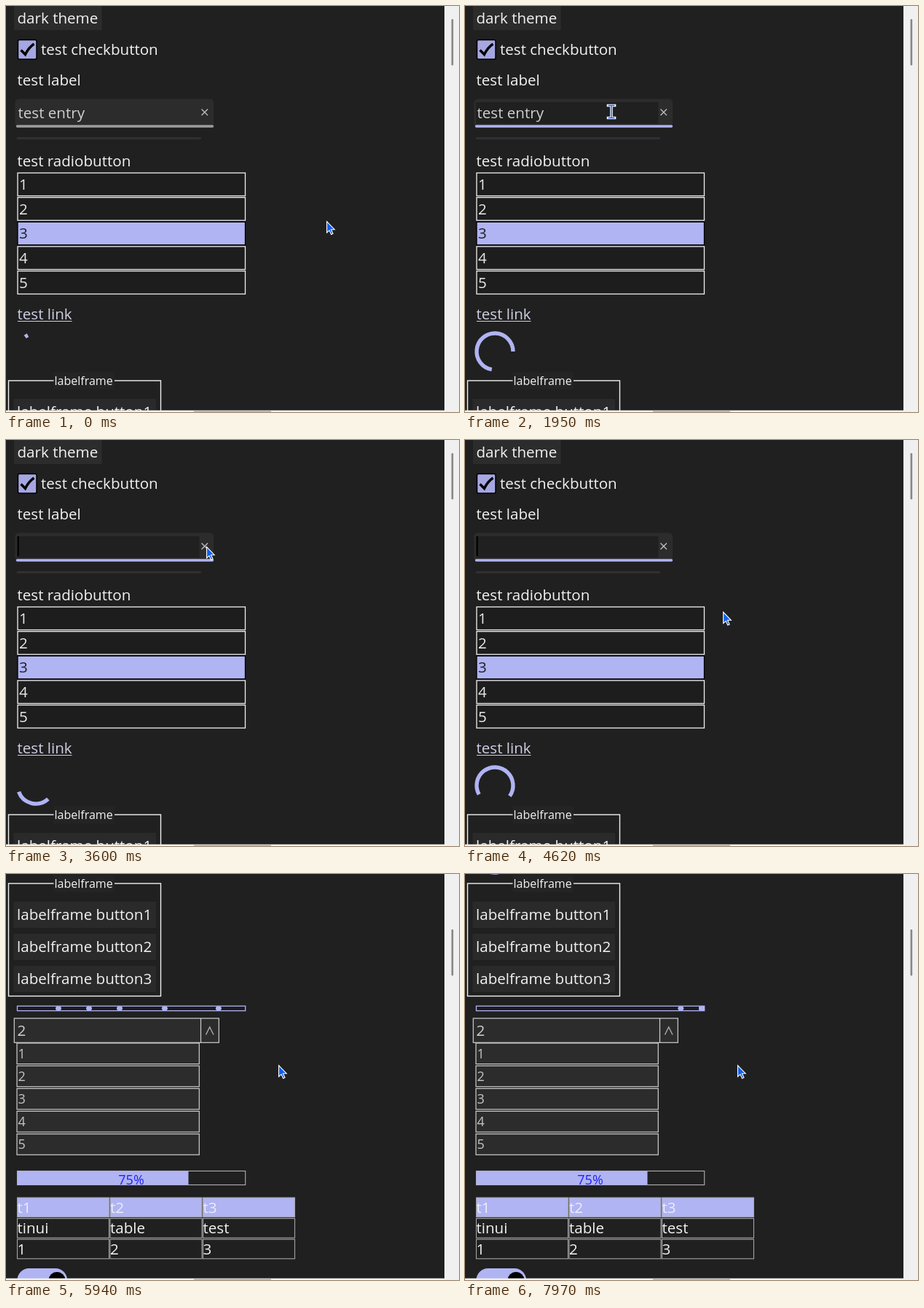
Recreate the animation shown at these times as an HTML page. Size 622 px wide and 557 px high, loop 8000 ms.

```html
<!DOCTYPE html>
<html lang="en">
<head>
<meta charset="utf-8">
<title>Widget demo</title>
<style>
  html, body { margin: 0; width: 100%; height: 100%; overflow: hidden; background: #202020; }
  svg { display: block; width: 622px; height: 557px; }
  text { font-family: "Open Sans", "Noto Sans", sans-serif; font-size: 20.6px; fill: #f2f2f2; white-space: pre; }
</style>
</head>
<body>
<svg id="stage" viewBox="0 0 622 557" xmlns="http://www.w3.org/2000/svg"></svg>
<script>
const LOOP = 8000;
const ACCENT = '#b0b4f3', BG = '#202020', PANEL = '#2c2c2c', SOFT = '#cfcfcf';
const PAGE = 501;            // scroll distance
const CLICK = 1200, CLEAR = 3200;
const stage = document.getElementById('stage');

function add(parent, tag, attrs, content) {
  const el = document.createElementNS('http://www.w3.org/2000/svg', tag);
  for (const key in attrs) el.setAttribute(key, attrs[key]);
  if (content !== undefined) el.textContent = content;
  parent.appendChild(el);
  return el;
}
const set = (el, attrs) => { for (const key in attrs) el.setAttribute(key, attrs[key]); };
const show = (el, on) => el.setAttribute('visibility', on ? 'visible' : 'hidden');
const box = (parent, x, y, right, bottom, fill, more) =>
  add(parent, 'rect', { x, y, width: right - x, height: bottom - y, fill, ...more });
const label = (parent, x, y, str, more) => add(parent, 'text', { x, y, ...more }, str);
const line = (parent, d, stroke, width, more) =>
  add(parent, 'path', { d, stroke, 'stroke-width': width, fill: 'none', ...more });

// Piecewise linear value from rows of [time, a, b]
function track(rows, t) {
  let i = 1;
  while (i < rows.length - 1 && t > rows[i][0]) i++;
  const p = rows[i - 1], q = rows[i];
  const k = Math.min(1, Math.max(0, (t - p[0]) / (q[0] - p[0])));
  return [p[1] + (q[1] - p[1]) * k, p[2] + (q[2] - p[2]) * k];
}

box(stage, 0, 0, 622, 557, BG);
const view = add(stage, 'g', {});

// Upper half of the page
const top1 = add(view, 'g', {});
box(top1, 11, -4, 131.5, 33, PANEL);
label(top1, 15.5, 23.5, 'dark theme');
box(top1, 16.5, 46.5, 42, 73, '#a6a7e2', { rx: 2, stroke: '#000', 'stroke-width': 1.5 });
line(top1, 'M20.5 60.5L26.5 66.5Q31 57 38.5 52', '#000', 3.4);
label(top1, 48, 67, 'test checkbutton');
label(top1, 15.5, 108.5, 'test label');

box(top1, 12.5, 127.5, 285, 166, PANEL, { rx: 5 });
const field = box(top1, 15, 132, 265.5, 161.5, BG);
const entryLine = line(top1, 'M15.5 165H283.5', '#9d9d9d', 3.4, { 'stroke-linecap': 'round' });
const entryText = label(top1, 16.5, 153.5, 'test entry', { style: 'fill:' + SOFT });
line(top1, 'M268.5 141.5L277 150M277 141.5L268.5 150', '#c0c0c0', 1.3);
const caret = box(top1, 15.5, 132, 17.5, 159, '#000');
line(top1, 'M16 181.5H266.5', '#303030', 3, { 'stroke-linecap': 'round' });

label(top1, 15.5, 219.5, 'test radiobutton');
for (let i = 0; i < 5; i++) {
  const y = 229 + i * 33.65, on = i === 2;
  box(top1, 16, y, 328.5, y + 31.5, on ? ACCENT : '#1d1d1d',
    { stroke: on ? '#000' : '#f0f0f0', 'stroke-width': 1.3 });
  label(top1, 18, y + 23, i + 1, { style: 'fill:' + (on ? '#202020' : '#e8e8e8') });
}
label(top1, 15.5, 429.5, 'test link', { style: 'fill:#cfcfe6' });
line(top1, 'M16 432.5H90.5', '#cfcfe6', 1.2);
const spinner = line(view, '', ACCENT, 5.4);

// Lower half, in coordinates of the scrolled page
const low = add(view, 'g', { transform: `translate(0 ${PAGE})` });
box(low, 3.5, 13, 212.5, 167.5, 'none', { stroke: '#f0f0f0', 'stroke-width': 1.4 });
box(low, 65.5, 1.5, 149, 25, '#242424');
label(low, 66.5, 19, 'labelframe', { style: 'font-size:16px' });
for (let i = 0; i < 3; i++) {
  box(low, 10.5, 38 + i * 44, 206, 74 + i * 44, '#2a2a2a');
  label(low, 15, 63 + i * 43.9, 'labelframe button' + (i + 1));
}

box(low, 15.5, 181.2, 328.7, 187.6, '#1c1c1c', { stroke: ACCENT, 'stroke-width': 1.3 });
const leftCap = box(low, 15, 181, 19, 188, ACCENT);
const rightCap = box(low, 325, 181, 329, 188, ACCENT);
const balls = Array.from({ length: 5 }, () =>
  add(low, 'ellipse', { cy: 184.4, rx: 4, ry: 3.1, fill: ACCENT }));

const frame = { stroke: SOFT, 'stroke-width': 1.2 };
box(low, 11.3, 198, 292.3, 231.3, PANEL, frame);
line(low, 'M267.5 198V231', SOFT, 1.2);
label(low, 15.5, 222, '2', { style: 'fill:' + SOFT });
line(low, 'M274.5 220.5L279.7 210L285 220.5', '#b4b4b4', 1.3);
for (let i = 0; i < 5; i++) {
  const y = 232 + i * 31.15;
  box(low, 15, y, 265.3, y + 28.6, PANEL, frame);
  label(low, 16.5, y + 20.5, i + 1, { style: 'font-size:18px;fill:#c4c4c4' });
}

box(low, 15.5, 407.5, 328.7, 426.5, BG, { stroke: '#b0b0b0', 'stroke-width': 1.1 });
box(low, 15.5, 407.5, 250.5, 426.5, ACCENT);
label(low, 172, 425.5, '75%', { 'text-anchor': 'middle', style: 'font-size:18px;fill:#2222f4' });

[['t1', 't2', 't3'], ['tinui', 'table', 'test'], ['1', '2', '3']].forEach((row, r) =>
  row.forEach((cell, c) => {
    const x = 15.5 + c * 127.5, y = 444 + r * 28.6;
    box(low, x, y, x + 126, y + 26.6, r ? BG : ACCENT, { stroke: '#a4a4a4', 'stroke-width': 1.1 });
    label(low, x, y + 20.8, cell, { style: r ? '' : 'fill:#ececfa' });
  }));

box(low, 15.5, 541, 84, 575, ACCENT, { rx: 16 });
add(low, 'circle', { cx: 70, cy: 557.5, r: 11.5, fill: '#000' });

// Window scrollbars
box(stage, 602, 0, 622, 557, '#f0f0f0');
box(stage, 0, 554.7, 622, 557, '#f0f0f0');
box(stage, 258, 555.6, 364, 557, '#a8a8a8');
const thumb = box(stage, 611.6, 18, 614.2, 81.5, '#868686', { rx: 1.2 });

const arrow = add(stage, 'path', {
  d: 'M.5 .5V16L4 12.8L6.6 18.4L9 17.3L6.4 11.7H11.2Z',
  fill: '#1260f2', stroke: '#fff', 'stroke-width': 1.1 });
const beam = add(stage, 'g', {});
const beamShape = 'M-4.5 -8.5H4.5M0 -8.5V8.5M-4.5 8.5H4.5';
line(beam, beamShape, '#fff', 3.6, { 'stroke-linecap': 'square' });
line(beam, beamShape, '#1260f2', 1.4);

const POINTER = [
  [40, 440, 295], [730, 278, 207], [870, 250, 175], [1150, 204, 146], [1950, 201, 145],
  [2150, 205, 145], [2500, 263, 145], [2700, 275, 146], [3650, 275, 146],
  [4140, 320, 190], [4900, 374, 262]
];
// Start angle and extent, counter-clockwise degrees
const SPIN = [[0, 116, 10], [730, 202, 119], [1950, 360, 260], [3600, 560, 472], [8000, 1097, 1044]];

function arc(start, extent) {
  const at = deg => {
    const a = deg * Math.PI / 180;
    return (41 + 25 * Math.cos(a)).toFixed(2) + ' ' + (474 - 25 * Math.sin(a)).toFixed(2);
  };
  return `M${at(start)}A25 25 0 ${extent > 180 ? 1 : 0} 0 ${at(start + extent)}`;
}

// Slow first half of the bar, fast second half
function ballX(age) {
  const slow = Math.max(0, age) * 0.084;
  const x = slow < 153 ? slow : 153 + (age - 1821) * 0.148;
  return 19 + Math.min(306, x);
}

function draw(t) {
  const notches = t < 5030 ? 0 : t < 5100 ? 3 : t < 5165 ? 6 : 9;
  const scroll = PAGE * notches / 9;
  view.setAttribute('transform', `translate(0 ${-scroll})`);
  thumb.setAttribute('y', 18 + 58 * notches / 9);

  const [start, extent] = track(SPIN, t);
  spinner.setAttribute('d', arc(start, extent % 360));

  const focus = t >= CLICK, cleared = t >= CLEAR;
  show(field, focus);
  show(entryText, !cleared);
  entryLine.setAttribute('stroke', focus ? ACCENT : '#9d9d9d');
  caret.setAttribute('x', cleared ? 15.7 : 107);
  show(caret, focus && (t - (cleared ? CLEAR : CLICK)) % 900 < 600);

  const xs = balls.map((ball, i) => {
    const x = ballX(t - 3310 - i * 500);
    ball.setAttribute('cx', x);
    return x;
  });
  show(leftCap, xs[4] <= 19);
  show(rightCap, xs[0] >= 325);

  const [x, y] = track(POINTER, t);
  const typing = x > 13 && x < 266 && y > 128 && y < 166;
  show(arrow, !typing);
  show(beam, typing);
  set(typing ? beam : arrow, { transform: `translate(${x} ${y})` });
}

function tick() {
  draw(performance.now() % LOOP);
  requestAnimationFrame(tick);
}
tick();
</script>
</body>
</html>
```
